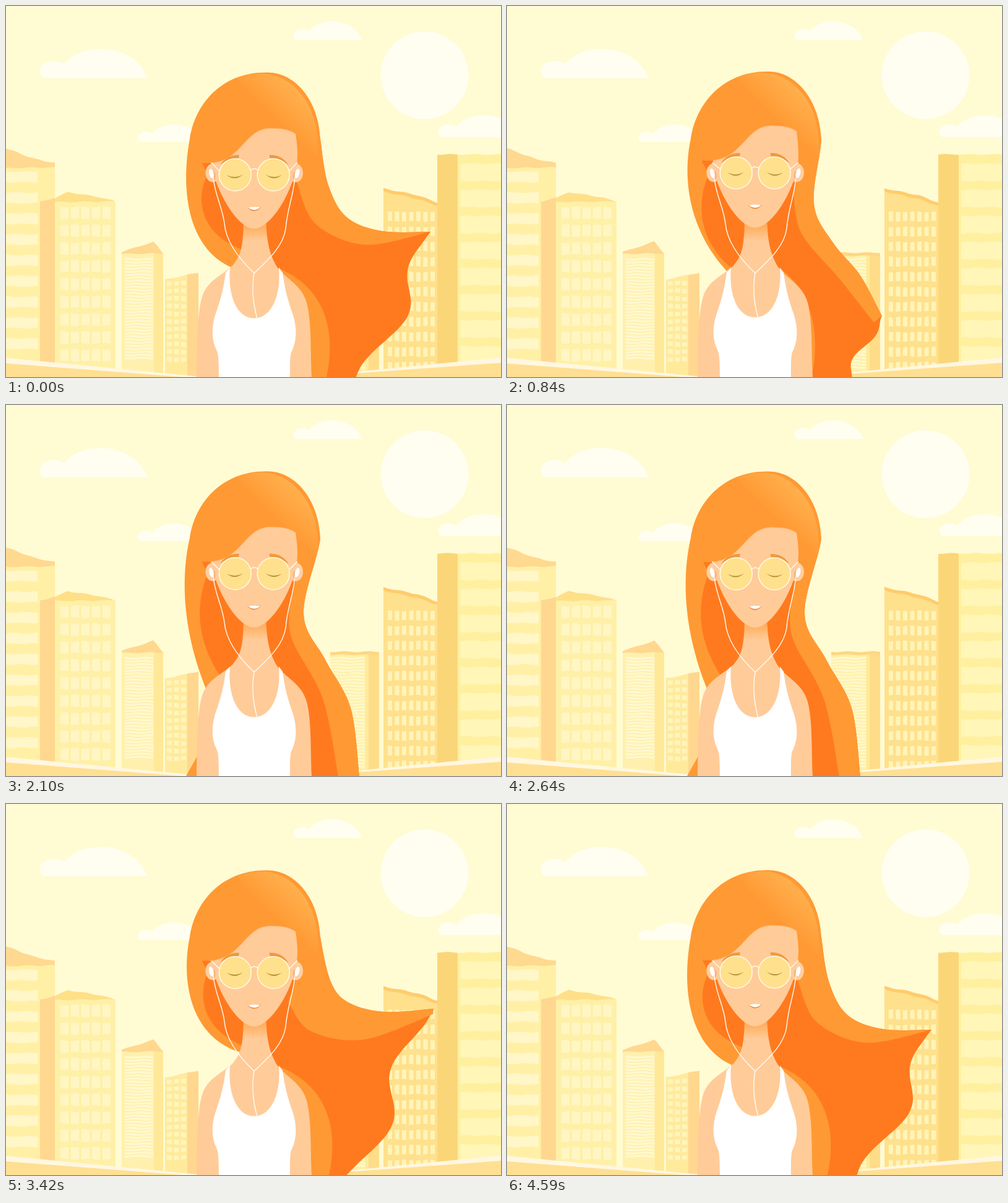
Recreate the animation shown at these times as an HTML page with a canvas. Size 800 by 600 pixels, loop 4.62 s.

```html
<!DOCTYPE html>
<html lang="en">
<head>
<meta charset="utf-8">
<title>Wind in the hair</title>
<style>
html, body { margin: 0; width: 100%; height: 100%; overflow: hidden; background: #fffbd3 }
canvas { display: block }
</style>
</head>
<body>
<canvas width="800" height="600"></canvas>
<script>
const c = document.querySelector('canvas').getContext('2d');
const LOOP = 4620, BEAT = 660, AXIS = 802.5;
const LIGHT = '#ff9933', DARK = '#ff7a1e', SKIN = '#ffcb99', PALE = '#fffef0';

const lerp = (a, b, k) => a + (b - a) * k;
const mix = (p, q, k) => p.map(([x, y], i) => [lerp(x, q[i][0], k), lerp(y, q[i][1], k)]);

// Smooth 0 to 1 while t runs from a to b
function ramp(t, a, b) {
  const s = Math.min(1, Math.max(0, (t - a) / (b - a)));
  return s * s * (3 - 2 * s);
}

const lines = pts => pts.forEach(p => c.lineTo(...p));
const bezier = pts => c.bezierCurveTo(...pts.flat());

function spline(pts, before = pts[0]) {
  c.lineTo(...pts[0]);
  for (let i = 0; i < pts.length - 1; i++) {
    const a = pts[i], b = pts[i + 1], p = pts[i - 1] || before, n = pts[i + 2] || b;
    c.bezierCurveTo(a[0] + (b[0] - p[0]) / 6, a[1] + (b[1] - p[1]) / 6,
      b[0] - (n[0] - a[0]) / 6, b[1] - (n[1] - a[1]) / 6, ...b);
  }
}

function shape(color, draw) {
  c.beginPath();
  draw();
  c.fillStyle = color;
  c.fill();
}

const fill = (color, d) => { c.fillStyle = color; c.fill(new Path2D(d)); };
const stroke = (color, width, d) => { c.strokeStyle = color; c.lineWidth = width; c.stroke(new Path2D(d)); };
const ellipse = (color, x, y, rx, ry, turn = 0) => shape(color, () => c.ellipse(x, y, rx, ry, turn, 0, 7));

function gradient(x0, y0, x1, y1, from, to) {
  const g = c.createLinearGradient(x0, y0, x1, y1);
  g.addColorStop(0, from);
  g.addColorStop(1, to);
  return g;
}

function shifted(dy, draw) {
  c.save();
  c.translate(0, dy);
  draw();
  c.restore();
}

function both(draw) {
  draw();
  c.save();
  c.translate(AXIS, 0);
  c.scale(-1, 1);
  draw();
  c.restore();
}

// Polygon whose long edges ripple gently
let ripple = 0;
function wavy(color, ...pts) {
  shape(color, () => pts.forEach(([x, y], i) => {
    const [nx, ny] = pts[(i + 1) % pts.length], steps = Math.ceil(Math.abs(nx - x) / 7) || 1;
    for (let j = 0; j < steps; j++) {
      const px = lerp(x, nx, j / steps), py = lerp(y, ny, j / steps);
      c.lineTo(px, py + 0.8 * Math.sin(px * 0.16 + py * 0.09 + ripple));
    }
  }));
}
const block = (color, x, y, w, h = 600 - y) => wavy(color, [x, y], [x + w, y], [x + w, y + h], [x, y + h]);

function windows(color, x, y, cols, rows, dx, dy, w, h) {
  for (let r = 0; r < rows; r++)
    for (let k = 0; k < cols; k++) block(color, x + k * dx, y + r * dy, w, h);
}

function cloud(x, y, s) {
  c.save();
  c.translate(x, y);
  c.scale(s, s);
  fill(PALE, 'M6 0C-8 -10 1 -28 22 -28Q32 -28 39 -23C55 -43 83 -51 116 -46Q158 -38 174 0Z');
  c.restore();
}

function sky() {
  c.fillStyle = '#fffbd3';
  c.fillRect(0, 0, 800, 600);
  ellipse(PALE, 676.5, 112, 71, 71);
  cloud(55, 117, 1);
  cloud(465, 55, 0.635);
  cloud(213, 220, 0.6);
  cloud(699, 212, 0.745);
}

function city() {
  block('#fff0a6', 0, 261, 79);
  wavy('#ffd98f', [0, 230], [45, 247], [79, 254], [79, 261], [0, 262]);
  windows('#fff7c8', 0, 268, 1, 9, 0, 33.7, 51, 17);

  wavy('#ffd78f', [55, 316], [79, 310], [79, 600], [55, 600]);
  block('#fff0a8', 79, 316, 98);
  wavy('#ffdf88', [79, 311], [100, 301], [150, 309], [177, 316], [79, 317]);
  windows('#fff6c4', 88, 325, 5, 9, 17, 28.8, 13, 19);

  block('#fff0ae', 187, 399, 52);
  block('#ffe897', 239, 399, 15);
  wavy('#ffd78f', [187, 398], [238, 381], [254, 400], [187, 401]);
  windows('#fff9d0', 192, 408, 1, 33, 0, 5, 46, 3);

  wavy('#ffea9c', [257, 442], [293, 435], [293, 600], [257, 600]);
  wavy('#ffd78f', [293, 435], [311, 431], [311, 600], [293, 600]);
  windows('#fff5bd', 260, 445, 3, 11, 11.5, 12.3, 8, 7);

  block('#fff0a6', 524, 403, 57);
  windows('#fff8cb', 524, 408, 1, 36, 0, 5, 56, 3);
  block('#ffeb98', 581, 403, 5);
  block('#ffdc88', 586, 399, 17);
  block('#ffd684', 524, 399, 79, 5);

  wavy('#ffe08c', [610, 296], [697, 319], [697, 600], [610, 600]);
  wavy('#ffcc6c', [610, 295], [665, 306], [697, 318], [697, 323], [665, 312], [610, 300]);
  windows('#fff4b8', 617, 333, 7, 11, 11.5, 24.3, 7, 15);

  block('#fff0a0', 730, 240, 70);
  windows('#fff6b8', 734, 255, 1, 8, 0, 42.2, 66, 28);
  block('#fbd678', 697, 240, 33);

  fill('#fff7e0', 'M0 569L310 599V600H0ZM800 568.5L490 599V600H800Z');
  fill('#ffdf92', 'M0 578L285 600H0ZM800 577L540 596V600H800Z');
}

// The free edge between tip and foot carries a wave that runs downwards
function freeEdge(tip, foot, t) {
  const size = Math.hypot(tip[0] - foot[0], tip[1] - foot[1]) / 280;
  const crest = 0.17 + ((t < LOOP / 2 ? t + LOOP : t) - 3960) * 0.0006;
  return Array.from({ length: 13 }, (_, i) => {
    const s = i / 12, swing = 18 * Math.sin(Math.PI * s) + 16 * s;
    const wave = s && size * swing * Math.cos(2 * Math.PI * (s - crest) / 0.88);
    return [lerp(tip[0], foot[0], s) + wave, lerp(tip[1], foot[1], s)];
  });
}

// Each lock blends from blown to hanging; lift raises the blown pose
function hair(t, up) {
  const droop = ramp(t, 0, 1440) - ramp(t, 2640, 3420);
  const lift = ramp(t, 2640, 3420) - ramp(t, 3420, LOOP);
  const bow = Math.sin(Math.PI * droop) * (t < LOOP / 2 ? 1 : 0);

  const outer = mix([[521, 290], [551, 342], [608, 364], [686, 365]],
    [[481, 338], [516, 412], [557, 490], [571, 600]], droop)
    .map(([x, y], i) => [x + 5 * lift - 3 * i * bow, y - 34 * lift * Math.sqrt(i / 3) - 4 * i * bow]);
  const inner = mix([[686, 365], [580, 386], [500, 352], [470, 285]],
    [[537, 600], [512, 475], [462, 378], [459, 315]], droop)
    .map(([x, y], i) => [x + (4 - 6 * i) * lift, y + (20 * i - 25) * lift]);
  const left = mix([[283, 290], [290, 390], [365, 423]], [[282, 280], [285, 370], [328, 470]], droop)
    .map(([x, y], i) => [x + 6 * i * lift + 10 * i * bow, y - (8 + 7 * i) * lift - 10 * i * bow]);
  const leftInner = mix([[306, 310], [312, 368], [382, 394]], [[303, 330], [312, 385], [345, 437]], droop)
    .map(([x, y]) => [x + 4 * lift, y - 2 * lift]);

  const tip = outer[3], foot = [lerp(580, 530, droop) - 24 * lift, lerp(601, 620, droop)];
  const temple = [297, 215 - up * 0.15], nape = [508, 215 - up * 0.15], top = 107.5 - up * 0.5;
  const fringe = 254 - up * 1.3, strand = lerp(536, 495, droop) + 4 * lift;

  shape(DARK, () => {
    spline([nape, ...outer], [502, 150]);
    spline(freeEdge(tip, foot, t));
    lines([[foot[0], 630], [400, 630], [400, 250]]);
  });
  shape(LIGHT, () => {
    c.moveTo(...left[2]);
    bezier([left[1], left[0], temple]);
    bezier([[305, 160], [347, top], [420, top]]);
    bezier([[465, top - 2], [505, 150], nape]);
    spline([nape, ...outer], [502, 150]);
    spline(inner);
    lines([[468, 285], [400, 285], [400, 430]]);
  });
  shape(DARK, () => {
    lines([[400, fringe], [317 - up * 0.8, fringe], [326, 272]]);
    bezier(leftInner);
    lines([[400, 440]]);
  });
  shape(LIGHT, () => {
    c.moveTo(440, 424);
    bezier([[strand - 28, 452], [strand, 515], [strand - 18, 600]]);
    lines([[440, 600]]);
  });
  shape(LIGHT, () => lines([[lerp(345, 309, droop), 568], [lerp(345, 291, droop), 600], [345, 600]]));

  shifted(-up * 0.5, () => fill(gradient(432, 186, 480, 135, 'rgba(255,178,80,0)', '#ffb250'),
    'M372 117C420 100 454 113 478 144C500 172 505 205 504 245Q430 180 372 117Z'));
}

function body(up) {
  fill(gradient(0, 356, 0, 380, '#ffae5e', SKIN),
    'M384 340C384 395 378 405 366 420C345 438 325 445 317 470C308 500 309 560 308 600H494C492 560 494 510 486 480C478 450 450 440 438 422C425 400 421 380 420 340Z');
  const dip = 505 - up * 0.45;
  fill('#fff', `M344 600C344 570 343 562 340 556C332 540 332 520 338 500C347 475 352 455 355 431L362 423
    C358 470 374 ${dip} 401 ${dip}C428 ${dip} 445 470 441 423L447 431C450 455 455 475 464 500
    C470 520 470 540 463 556C459 562 459 570 459 600Z`);
}

function face(up) {
  const y = n => n - up * 1.35, chin = 360 - up * 0.5;
  const hairline = `M333 ${y(254)}C385 ${y(248)} 385 ${y(195)} 432 ${y(198)}C448 ${y(198)} 460 ${y(201)} 468 ${y(207)}`;

  both(() => shifted(-up * 0.15, () => ellipse('#ffcfa2', 334, 270, 11.5, 15)));
  fill(SKIN, `${hairline}Q471 ${y(225)} 471 240C471 290 430 ${chin} 401 ${chin}C372 ${chin} 335 290 333 255Z`);
  stroke('#ffb878', 1.2, hairline);

  both(() => {
    shifted(-up * 0.15, () => {
      ellipse('#f9b078', 336, 275, 2.5, 7);
      ellipse('#fff', 332, 271, 3.5, 8, -0.25);
    });
    shifted(-up, () => {
      fill('#f09a3e', 'M377 241Q357 240 346 257Q360 246 376 246Z');
      ellipse('#ffe08c', 370.3, 273, 26, 26);
      stroke('#fffbe8', 1.5, 'M396.3 273A26 26 0 1 1 344.3 273A26 26 0 1 1 396.3 273M395 266Q398 263 401.3 263');
    });
    stroke('#fffbe8', 1.5, `M345 ${267 - up}L331.5 253`);
    shifted(-up * 1.25, () => fill('#b59238', 'M357 273.5Q370 284 383 272.5Q370 280 357 273.5Z'));
  });

  shifted(-up * 1.15, () => {
    fill('#ea9048', 'M390 326L412 325Q402 338 390 326Z');
    fill('#fff', 'M391 326Q401 324 411 325.3Q402 334 391 326Z');
  });
}

function cords(up) {
  stroke('#fffdf5', 1.4, `M335 277C337 305 350 325 353 352C356 385 382 414 401 432
    C420 414 448 390 452 360C455 325 464 310 467 277M401 432C397 455 399 480 405.5 ${504 - up * 0.4}`);
}

function frame(now) {
  const t = now % LOOP, turn = ms => Math.cos(2 * Math.PI * ms / BEAT);
  const up = 6.2 * (turn(55) - turn(t - 55));
  ripple = 1.3 * (1 - turn(t));
  sky();
  city();
  hair(t, up);
  body(up);
  face(up);
  cords(up);
  requestAnimationFrame(frame);
}
requestAnimationFrame(frame);
</script>
</body>
</html>
```
